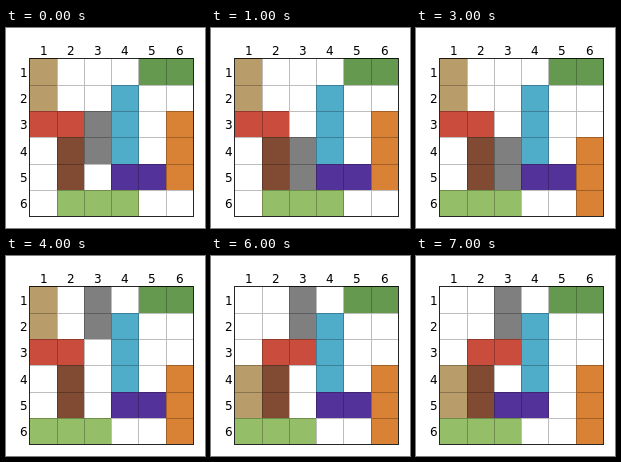
An HTML page for the animation above (8000 ms loop, 199 by 200 pixels).

```html
<!DOCTYPE html>
<html lang="en">
<head>
<meta charset="utf-8">
<title>Sliding blocks</title>
<style>
  html, body { margin: 0; width: 100%; height: 100%; overflow: hidden; background: #fff; }
  svg { display: block; width: 100%; height: 100%; }
  text { font: 12px "DejaVu Sans", sans-serif; fill: #000; }
  rect, path { shape-rendering: crispEdges; }
</style>
</head>
<body>
<svg id="stage" viewBox="0 0 199 200"></svg>
<script>
const NS = "http://www.w3.org/2000/svg";
const stage = document.getElementById("stage");
const xs = [24, 51, 78, 105, 133, 160, 187];
const ys = [30, 57, 83, 109, 136, 162, 188];
const STEP = 1000, STEPS = 8;

// Column, row, width and height in cells
const blocks = {
  tan:    { at: [0, 0], size: [1, 2], fill: "#b89c6a" },
  green:  { at: [4, 0], size: [2, 1], fill: "#659950" },
  blue:   { at: [3, 1], size: [1, 3], fill: "#50adca" },
  red:    { at: [0, 2], size: [2, 1], fill: "#c94c3c" },
  gray:   { at: [2, 2], size: [1, 2], fill: "#7f7f7f" },
  brown:  { at: [1, 3], size: [1, 2], fill: "#804a33" },
  purple: { at: [3, 4], size: [2, 1], fill: "#53339a" },
  orange: { at: [5, 2], size: [1, 3], fill: "#d98235" },
  lime:   { at: [1, 5], size: [3, 1], fill: "#94be68" }
};

// One move at the start of each step after the first
const moves = [
  ["gray", 2, 3],
  ["lime", 0, 5],
  ["orange", 5, 3],
  ["gray", 2, 0],
  ["red", 1, 2],
  ["tan", 0, 3],
  ["purple", 2, 4]
];

function add(tag, attrs, text) {
  const el = document.createElementNS(NS, tag);
  for (const key in attrs) el.setAttribute(key, attrs[key]);
  if (text) el.textContent = text;
  stage.appendChild(el);
  return el;
}

function place(block, [col, row]) {
  const [w, h] = block.size;
  const x = xs[col], y = ys[row];
  block.el.setAttribute("x", x);
  block.el.setAttribute("y", y);
  block.el.setAttribute("width", xs[col + w] - x);
  block.el.setAttribute("height", ys[row + h] - y);
}

for (const block of Object.values(blocks)) block.el = add("rect", { fill: block.fill });

const innerX = [51, 78, 105, 132, 160].map(x => `M${x + 0.5} 31V188`);
const innerY = ys.slice(1, 6).map(y => `M24 ${y + 0.5}H187`);
add("path", { d: [...innerX, ...innerY].join(""), stroke: "#000", "stroke-opacity": 0.26 });
add("path", { d: "M23.5 30.5H187.5V188.5H23.5Z", fill: "none", stroke: "#000", "stroke-opacity": 0.85 });

for (let i = 0; i < 6; i++) {
  const x = 24 + (i + 0.5) * 163 / 6;
  const y = 30 + (i + 0.5) * 158 / 6;
  add("text", { x: Math.round(x - 3.8), y: 27 }, i + 1);
  add("text", { x: 14, y: Math.round(y + 5.4) }, i + 1);
}

function render(time) {
  const step = Math.floor(time / STEP) % STEPS;
  const spots = {};
  for (const name in blocks) spots[name] = blocks[name].at;
  for (const [name, col, row] of moves.slice(0, step)) spots[name] = [col, row];
  for (const name in blocks) place(blocks[name], spots[name]);
}

const start = performance.now();
function tick() {
  render(performance.now() - start);
  requestAnimationFrame(tick);
}
tick();
</script>
</body>
</html>
```
